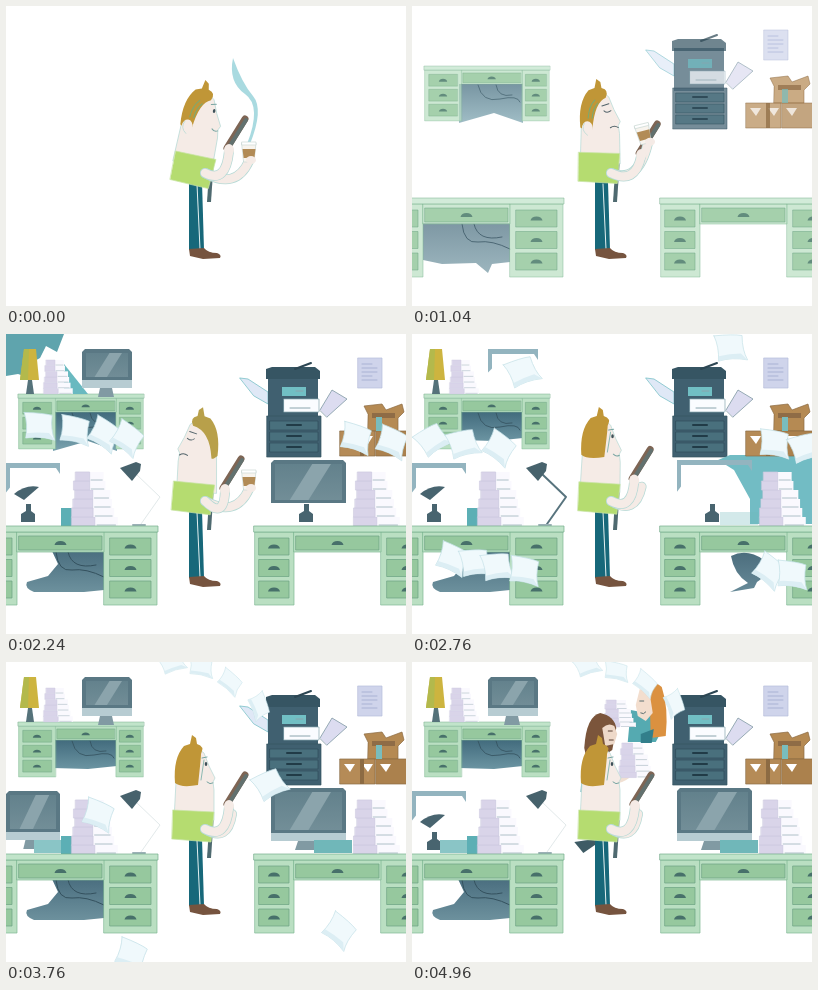
Write an HTML page with a canvas that moves like this. It is 400x300 px and loops after 5 s.

```html
<!DOCTYPE html>
<html lang="en">
<head>
<meta charset="utf-8">
<title>Office morning</title>
<style>
html, body { margin: 0; height: 100%; overflow: hidden; background: #fff; }
canvas { display: block; width: 400px; height: 300px; }
</style>
</head>
<body>
<canvas id="stage" width="400" height="300"></canvas>
<script>
const ctx = document.getElementById('stage').getContext('2d');
const LOOP = 5000, FALL = 0.255, STRIDE = 0.253;
const DARK = '#406070', TEAL = '#69b9c0', SKIN = '#f5ebe6', EDGE = '#b5d9d5', MAUVE = '#d9d4e9';
let t = 0;

const clamp = v => Math.max(0, Math.min(1, v));
const ramp = (a, b) => { const v = clamp((t - a) / (b - a)); return v * v * (3 - 2 * v); };
const pulse = (a, b, c, d) => ramp(a, b) - ramp(c, d);
const within = (a, b) => t >= a && t < b;
const random = seed => { const v = Math.sin(seed * 12.9898) * 43758.5453; return v - Math.floor(v); };

function fill(color, d, edge) {
  ctx.fillStyle = color;
  ctx.fill(new Path2D(d));
  if (edge) line(edge, 0.7, d);
}
function line(color, width, d) {
  ctx.strokeStyle = color;
  ctx.lineWidth = width;
  ctx.lineCap = ctx.lineJoin = 'round';
  ctx.stroke(new Path2D(d));
}
function box(color, x, y, w, h, edge) {
  fill(color, `M${x} ${y}h${w}v${h}h${-w}z`, edge);
}
function oval(color, x, y, rx, ry = rx) {
  ctx.fillStyle = color;
  ctx.beginPath();
  ctx.ellipse(x, y, rx, ry, 0, 0, 7);
  ctx.fill();
}
function place(x, y, sx, sy, draw, angle = 0) {
  ctx.save();
  ctx.translate(x, y);
  ctx.rotate(angle);
  ctx.scale(sx, sy);
  draw();
  ctx.restore();
}
function shade(y0, y1, a, b) {
  const g = ctx.createLinearGradient(0, y0, 0, y1);
  g.addColorStop(0, a);
  g.addColorStop(1, b);
  return g;
}
function appear(start, span, draw) {
  if (t <= start) return;
  ctx.save();
  ctx.globalAlpha = clamp((t - start) / span);
  draw();
  ctx.restore();
}

// ---- Furniture ----
function drawer(x, y, w, h) {
  box('#96c89e', x, y, w, h, '#6ba381');
  const cx = x + w / 2, cy = y + h / 2;
  fill('#47706a', `M${cx - 6} ${cy + 2}q1 -4 6 -4t6 4z`);
}
function desk() {
  box('#badfc2', 0, 6, 39, 73, '#80b894');
  box('#badfc2', 126, 6, 53, 73, '#80b894');
  box('#badfc2', 39, 6, 87, 20, '#80b894');
  for (let row = 0; row < 3; row++) {
    drawer(4, 12 + row * 21.5, 30, 17);
    drawer(132, 12 + row * 21.5, 41, 17);
  }
  drawer(41, 10, 83, 14);
  box('#c1e4ca', -1, 0, 181, 6, '#74ac8b');
}
function kneeHole() {
  const whole = t < 1900 || within(3900, 4700);
  fill(shade(218, 262, '#4b6f80', '#7094a0'), whole
    ? 'M11 217H98V256L80 258 76 267 64 257 30 258 11 254Z'
    : 'M46 217H98V256L78 258H28Q18 254 21 248L42 242 52 230Z');
  line('#34515e', 1, 'M50 218Q52 238 66 236T98 243M62 218Q66 236 90 231');
}
function monitor(w, h, lit, chin) {
  if (!lit) return fill('#93b4bf', `M0 0H${w}V11L${w - 4} 5H4V${h * .5}L0 ${h * .6}Z`);
  const bottom = h - (chin ? 10 : 12);
  fill('#5a7884', `M3 0H${w - 3}L${w} 3V${bottom + 2}H0V3Z`);
  fill(shade(0, h, '#61808b', '#77929b'), `M4 4H${w - 4}V${bottom - 1}H4Z`);
  fill('#8ba4ac', `M${w * .55} 4H${w * .8}L${w * .5} ${bottom - 1}H${w * .25}Z`);
  if (!chin) return;
  box('#b7ccd2', 0, h - 8, w, 8);
  fill('#819aa3', `M${w * .36} ${h}H${w * .6}L${w * .64} ${h + 9}H${w * .32}Z`);
}
function bottle() {
  fill('#48646f', 'M-2 -18H3V-11L7 -8V0H-7V-8L-2 -11Z');
}
function stack() {
  for (let i = 0; i < 6; i++) {
    const x = i + 5 * random(i + 3), y = 45 - i * 9, w = 46 - i * 3.6;
    box('#faf9fe', x, y, w, 9);
    box(MAUVE, x, y, w * .5, 9, '#cbc7df');
    line('#9db0b9', .8, `M${x + w * .55} ${y + 8}h${w * .4}`);
  }
}
function copier() {
  if (t < 4600) fill('#dfe8f6', 'M234 44L242 45 262 58V70L248 62Z', TEAL);
  fill('#dcdcf0', 'M314 76L326 56 341 65 321 83Z', '#718e99');
  box(DARK, 262, 42, 50, 43);
  fill('#365563', 'M260 35L266 33H309L314 37V45H260Z');
  line('#2c4653', 2, 'M289 35L305 29');
  box(DARK, 261, 82, 54, 41, '#345360');
  for (let y = 87; y < 115; y += 11) {
    box('#49707d', 264, y, 48, 9, '#2f4c59');
    line('#213b47', 2, `M281 ${y + 4}h14`);
  }
  box('#71bfc4', 276, 53, 24, 9);
  box('#fafcff', 278, 65, 35, 13, '#88a6b0');
  line('#8aa4ad', 1, 'M284 74h20M290 57h7');
}
function cartons() {
  fill('#b58a53', 'M362 80L358 72 376 70 380 76 396 70 398 78 392 84V97H362Z', '#8c6b43');
  box('#8f6c46', 366, 79, 23, 5);
  box('#b58b57', 334, 97, 35, 25, '#8c6b43');
  box('#ab814d', 370, 97, 31, 25, '#8c6b43');
  box('#79bdbd', 370, 83, 6, 14);
  for (let x = 338; x < 390; x += 18) fill('#fff', `M${x} 102h11l-5 8z`);
  box('#8c6b43', 354, 97, 4, 25);
}
function note() {
  box('#cfd4eb', 352, 24, 24, 30, '#b7bddb');
  for (let y = 30; y < 49; y += 4) line('#a0a9cf', .8, `M356 ${y}h${y % 3 ? 15 : 10}`);
}
function deskLamp(pale) {
  line(pale ? '#58747e' : '#e2e9ea', pale ? 2 : 1, 'M130 140L154 163 135 190');
  fill('#47626c', 'M114 134L130 128 135 130 134 137 126 147Z');
  line('#9bb0b6', 2, 'M127 191h12');
}
function shadeLamp() {
  fill('#cdb43f', 'M18 15H30L33 46H14Z');
  fill('#b3b94c', 'M18 15H23L22 46H14Z');
  fill('#55727a', 'M22 46h4l2 14h-8z');
}

function background(pale) {
  appear(720, 450, () => {
    fill(shade(78, 118, '#426b7d', '#7ba4b0'), `M47 78H111V${t < 2500 ? 117 : 104}L82 107 47 ${t < 2500 ? 117 : 106}Z`);
    line('#34515e', .8, 'M66 79Q70 97 88 93T108 96M84 79Q86 92 100 89');
    place(137, 60, -.695, .695, desk);
    copier();
    note();
    if (pale) fill('#72bcc4', 'M306 126L318 121H400V190H338V165L322 136Z');
    cartons();
  });
  appear(1750, 200, () => {
    if (t < 2550) {
      fill('#5fa4ad', 'M0 0H58L51 18 40 12 34 24 25 29 18 42 12 40 0 42Z');
      fill(TEAL, 'M58 30L74 50 82 60H58Z');
    }
    shadeLamp();
    place(36, 26, .63, .63, stack);
    place(76, 15, 1, 1, () => monitor(50, 39, !pale, true));
  });
  if (within(3900, 4550)) place(352, 25, .7, .9, stack);
}
function foreground(pale) {
  const settled = t > 3700;
  appear(720, 450, () => {
    kneeHole();
    if (within(1100, 1900) || pale)
      fill(shade(218, 258, '#4b6d7d', '#678a98'), 'M319 222Q335 214 352 226Q358 240 345 248L342 254 318 258 336 249Q322 240 319 222Z');
  });
  appear(1850, 200, () => {
    const leftLit = within(3700, 4650);
    place(0, 129, 1, 1, () => monitor(54, 49, leftLit, true));
    if (!leftLit) {
      fill('#48646f', 'M8 160Q20 150 33 153L18 166Z');
      place(22, 188, 1, 1, bottle);
    }
    box('#5cafb5', 55, 174, 14, 18);
    if (settled) box('#8ac5c6', 28, 178, 27, 13);
    place(63, 138, 1, 1, stack);
    deskLamp(pale);
    place(265, 126, 1, 1, () => monitor(75, 53, !pale, settled));
    if (!settled) place(300, 188, 1, 1, bottle);
    place(345, 138, 1, 1, stack);
  });
  appear(2700, 200, () => box('#70b7b9', 308, 178, 38, 13));
  appear(720, 450, () => {
    place(-28, 192, 1, 1, desk);
    place(249, 192, 1, 1, desk);
  });
}

// ---- Paper ----
function sheet() {
  fill('#f0f9fc', 'M-17 -11Q2 -14 11 -13Q12 2 18 11Q2 9 -11 14Q-11 0 -17 -11Z', '#c6e2e8');
  fill('#dceef4', 'M-11 14Q2 9 18 11L11 5Q-1 6 -11 9Z');
}
// A row of sheets that passes x, y at the given time.
function volley(time, x, y, count = 1) {
  for (let i = 0; i < count; i++) {
    const seed = x + i, drop = y + (t - time) * FALL + i * 4;
    if (drop < -25 || drop > 325) continue;
    const sway = Math.sin((t - time) / 260 + i);
    place(x + i * 29 + 8 * sway, drop, 1, 1, sheet, random(seed) * .9 - .2 + .4 * sway);
  }
}
function papers() {
  if (t < 1720) return;
  volley(2240, 33, 92, 4);
  volley(2240, 350, 104, 2);
  volley(3240, 118, 160);
  volley(3240, 85, 20);
  volley(3240, 326, 136);
  volley(3240, 28, 228, 3);
  volley(3240, 370, 232, 2);
  volley(4280, 271, 255);
  if (t < 2900) return;
  const drift = (t - 3240) / 130;
  for (let i = 0; i < 4; i++)
    place(162 + i * 29 + drift, 3 + i * i * 4.4 + 2 * Math.sin(drift + i), .8, .65, sheet, i * .5 - .2);
}

// ---- Man ----
function head(turned, hairWidth, sad) {
  fill(SKIN, 'M-19 8L-17 -30 -8 -50Q0 -69 11 -59L16 -46 22 -34 20 -30 21 -22 21 8Z', EDGE);
  fill(turned ? '#b8a04a' : '#c09637', `M-18 -29Q-20 -54 -9 -66L-3 -68 -1 -77 3 -74 4 -68Q12 -66 8 -58
    Q${hairWidth - 3} -54 ${hairWidth - 6} -27Q-12 -24 -18 -29Z`);
  if (hairWidth > 0) line('#8cb9b2', 1, `M${hairWidth} -52L${hairWidth - 3} -32`);
  else if (!turned) {
    line('#78aa75', 1, 'M-10 -38Q-9 -50 -3 -56M-6 -38Q-5 -48 0 -53');
    oval(SKIN, -11, -28, 5.5, 7);
    line(EDGE, .7, 'M-14 -33Q-18 -26 -11 -21');
  }
  if (sad) {
    line('#52636a', 1, 'M6 -45Q9 -42 13 -45M4 -50L11 -52M12 -28Q16 -31 20 -28');
  } else {
    oval('#3e5159', 13, -48, 1.3, 2);
    line('#78a5a2', 1, 'M9 -54L14 -55M14 -30Q17 -27 20 -29');
  }
}
function arm(x, y) {
  const d = `M199 167Q${(199 + x) / 2 + 9} ${Math.max(y + 29, 178)} ${x} ${y}`;
  line(EDGE, 10, d);
  line(SKIN, 8.5, d);
}
function cup() {
  fill('#f8f4ee', 'M-7 -9H7L5 10H-5Z', '#c8d7d4');
  fill('#b28b56', 'M-6.5 -3H6.5L5.4 6H-5.4Z');
  box('#fff', -7, -10, 14, 3, '#ccd9d5');
}
function steam() {
  const s = Math.sin(t / 170) * 3;
  if (t < 420) {
    const top = 52 - t * .05;
    ctx.save();
    ctx.globalAlpha = clamp((420 - t) / 200);
    fill('#a9dae0', `M227 ${top}Q${222 + s} 76 239 88T241 138H244Q${258 + s} 103 247 90T227 ${top}Z`);
    ctx.restore();
  } else if (t < 960) {
    fill('#8ecdd0', `M210 ${86 + s}l2 -3 5 1 -3 5 -2 4z`);
  } else if (within(1160, 2000)) {
    place(0, -((t - 1600) % 500) * .03, 1, 1, () =>
      fill('#cbe8ec', 'M236 111Q247 109 243 99Q242 106 236 111ZM241 79Q246 90 256 84Q246 84 241 79Z'));
  }
}
function man() {
  const sip = pulse(180, 600, 860, 1240), gloom = pulse(860, 1240, 2550, 2850), calm = ramp(2550, 2850);
  const lean = (10 * (1 - ramp(180, 600)) - 5 * sip + 3 * gloom) * Math.PI / 180;
  const turned = within(2000, 2620);
  const px = 221 + 15 * sip - 4 * gloom, py = 142 - sip + 12 * gloom;
  const cupX = 243 - 21 * sip - 17 * calm, cupY = 146 - 34 * sip - 3 * calm;
  const handX = cupX + 8 * sip, handY = cupY + 9;

  fill('#17687a', 'M183 176H196L198 244H183Z');
  line('#e5f1f1', 1, 'M191 178L194 243');
  fill('#76543f', 'M183 243L198 242Q202 247 211 247Q216 249 214 252L197 253 184 250Z');
  fill('#4f6a70', 'M204 152h4L205 196h-4z');
  place(turned ? 192 : 187, 150, turned ? -1 : 1, 1,
    () => head(turned, turned ? -6 : calm > .5 ? 11 : 0, within(480, 2700)), lean);
  if (sip > .7) fill('#70b8b9', 'M199 107L209 107 207 114Z');
  place(187, 164 - 4 * sip, 1, 1,
    () => fill('#b5dc70', 'M-20 -16L21 -14 18 16 -21 13Z', '#c8e4a5'), lean * .9);

  line('#7e6554', 7, `M${px} ${py}l18 -29`);
  line('#62716f', 4, `M${px + 1} ${py + 1}l18 -29`);
  arm(handX, handY);
  arm(px + 2, py + 3);
  oval(SKIN, px + 2, py + 2, 5, 6);
  steam();
  if (t < 2700) {
    place(cupX, cupY, 1, 1, cup, -.45 * sip);
    oval(SKIN, handX + 2, handY - 1, 5, 4);
  }
}

// ---- Colleagues walking in from both sides ----
function redhead() {
  fill('#55aab1', 'M219 48L240 52 251 67 244 80 216 80Z');
  fill('#db9140', 'M228 25Q238 15 250 25Q257 46 254 74L239 76 238 38Z');
  fill('#f3dece', 'M228 27L238 32 241 51 234 59 226 54 224 43Z');
  line('#5c6e70', 1, 'M228 39h4M229 51q3 2 5 -1');
  place(190, 38, .7, .5, stack);
  fill('#327f8b', 'M229 72l13 -5 -2 14h-11z');
}
function brunette() {
  fill('#83bfc5', 'M172 96L190 94 204 112 200 132 168 130Z');
  const step = 8 * Math.sin((t - 4960) / 120);
  if (t > 4500) fill('#3e5b65', `M${162 + step} 180l20 -3 2 5 -13 9z`);
  fill('#7b553b', 'M172 86Q174 54 188 51Q202 54 204 66L200 88 188 96 174 95Z');
  fill('#eed9c9', 'M190 66Q196 60 202 64L205 72 202 82 193 84Z');
  line('#5b4034', 1, 'M196 69h4M197 78h4');
  line('#f1e0d3', 6, 'M190 118Q205 122 216 113');
  place(205, 81, .74, .64, stack);
}
function colleagues() {
  if (t < 4150) return;
  const away = (4960 - t) * STRIDE;
  place(away, 0, 1, 1, redhead);
  place(-away, 0, 1, 1, brunette);
}

function render(now) {
  t = now % LOOP;
  const pale = within(2700, 3700);
  ctx.fillStyle = '#fff';
  ctx.fillRect(0, 0, 400, 300);
  background(pale);
  colleagues();
  foreground(pale);
  man();
  papers();
}
const begin = performance.now();
function frame() {
  render(performance.now() - begin);
  requestAnimationFrame(frame);
}
frame();
</script>
</body>
</html>
```
